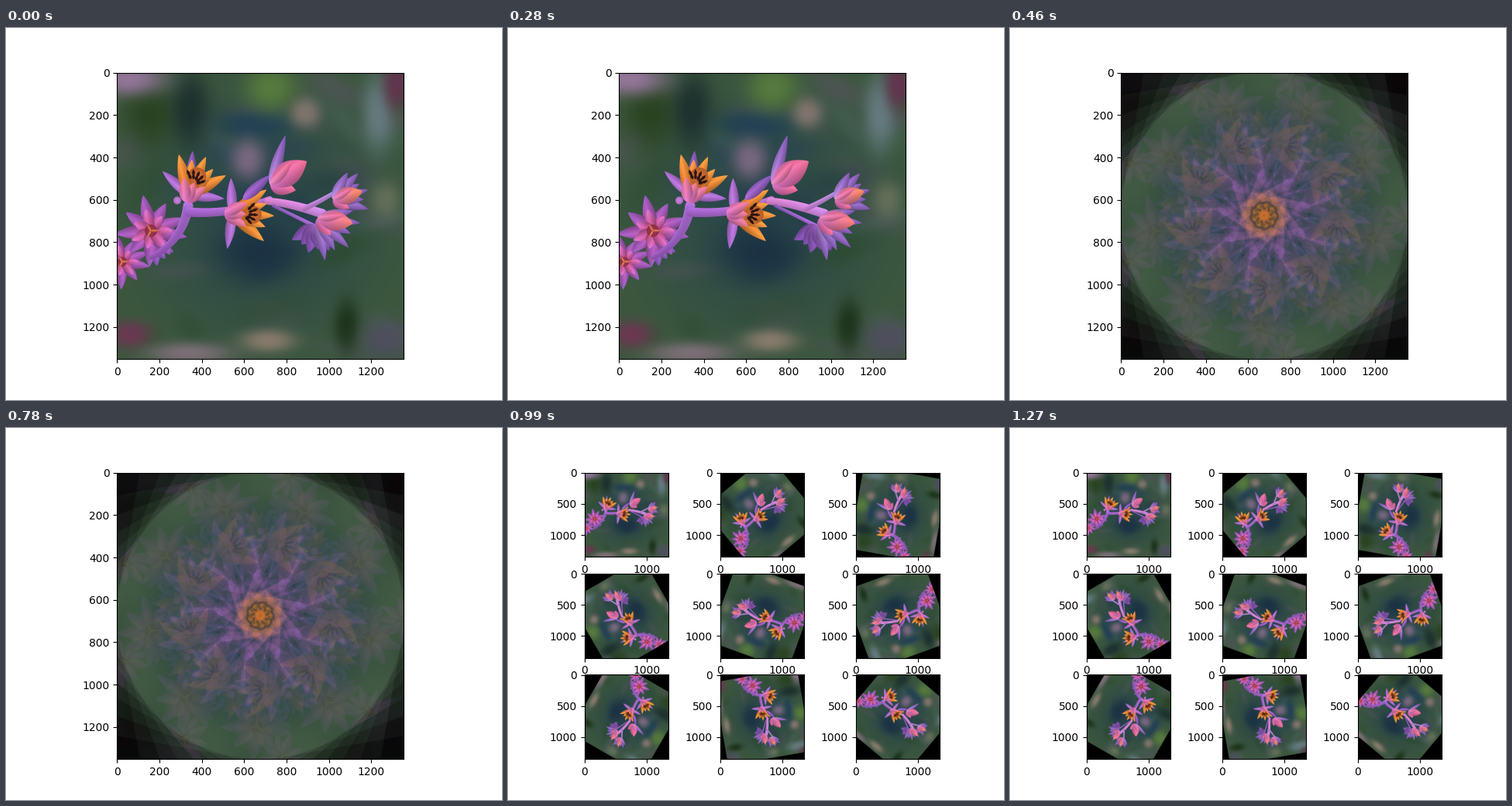
Recreate the animation shown at these times as a matplotlib script. Size 640 px wide and 480 px high, loop 1.45 s.

```python
import numpy as np
import matplotlib.pyplot as plt
from matplotlib.animation import FuncAnimation

SIZE = 1352            # units along each image axis
PX, K = 370, 2         # image width in pixels, oversampling
N = PX * K
LEFT, TOP = 143, 57.5  # stage position of the image
STEP = 10              # ms per frame
ONE, MEAN, GRID = 460, 530, 460

VIOLET, MAUVE, LILAC = '7d55ad', 'a566cc', 'b78bdc'
PINK, ROSE, ORANGE, AMBER = 'dc74c4', 'e66a90', 'e0702c', 'f09a40'
PLUM, DARK = 'c04a80', '2c1512'

rng = np.random.default_rng(4)
yy, xx = np.mgrid[0:N, 0:N]
X = LEFT + (xx + .5) / K
Y = TOP + (yy + .5) / K


def rgb(h):
    return np.array([int(h[i:i + 2], 16) for i in (0, 2, 4)], float)


def mix(c0, c1, t):
    t = np.asarray(t)[..., None]
    return rgb(c0) * (1 - t) + rgb(c1) * t


def polar(x, y, r, ang):
    b = np.radians(ang)
    return x + r * np.cos(b), y - r * np.sin(b)


# ---- blurred backdrop
img = mix('28454b', '3c573e', np.clip(np.hypot(X - 328, Y - 242) / 200, 0, 1))


def blob(x, y, rx, ry, col, tilt=0, alpha=.92):
    c, s = np.cos(tilt), np.sin(tilt)
    u = ((X - x) * c + (Y - y) * s) / rx
    v = ((Y - y) * c - (X - x) * s) / ry
    a = alpha * np.exp(-(u * u + v * v) ** 1.25)[..., None]
    img[:] += (rgb(col) - img) * a


for i in range(40):
    x, y = rng.uniform(LEFT, LEFT + PX), rng.uniform(TOP, TOP + PX)
    near = np.hypot(x - 328, y - 242) < 110
    tones = ['25405a', '1f3740'] if near else ['2b4a2c', '4c665f', '54545c']
    blob(x, y, rng.uniform(20, 45), rng.uniform(10, 20), rng.choice(tones),
         rng.uniform(-1, 1), .4)

for spot in [(185, 110, 34, 46, '28421f'), (238, 105, 26, 50, '1c2f2d'),
             (320, 125, 52, 20, '203f56'), (325, 290, 55, 38, '1b3144'),
             (440, 385, 17, 34, '1b3218'), (342, 78, 34, 30, '587d3e'),
             (312, 170, 22, 26, '7d6a84'), (386, 110, 20, 20, '84776f'),
             (480, 110, 20, 50, '677d83'), (504, 74, 18, 32, '64324f'),
             (490, 222, 20, 24, '65705a'), (490, 402, 34, 26, '504e60'),
             (156, 66, 48, 22, '9a78a0'), (160, 396, 28, 18, '6e3653'),
             (236, 420, 56, 14, '80707a'), (338, 404, 36, 15, '8c7d6e')]:
    blob(*spot)


# ---- plant
def window(xs, ys, pad):
    def cut(v, o):
        return slice(max(0, int((min(v) - pad - o) * K)),
                     max(0, int((max(v) + pad - o) * K) + 2))
    return cut(ys, TOP), cut(xs, LEFT)


def blend(win, a, col):
    img[win] += (np.clip(col, 0, 255) - img[win]) * a[..., None]


def petal(x, y, r, ang, w, c0, c1, fat=.75):
    """Pointed leaf of length r and half width w."""
    x1, y1 = polar(x, y, r, ang)
    win = window((x, x1), (y, y1), w + 1)
    dx, dy = (x1 - x) / r, (y1 - y) / r
    px, py = X[win] - x, Y[win] - y
    t = np.clip((px * dx + py * dy) / r, 0, 1)
    d = py * dx - px * dy
    half = w * np.sin(np.pi * t ** fat) ** .85
    a = np.clip((half - abs(d)) * K + .5, 0, 1) * (t > 0) * (t < 1)
    shade = 1.1 - .3 * abs(d / w + .25)
    blend(win, a, mix(c0, c1, t) * shade[..., None])


def dot(x, y, r, col):
    win = window((x - r, x + r), (y - r, y + r), 1)
    q = np.hypot(X[win] - x, Y[win] - y)
    a = np.clip((r - q) * K + .5, 0, 1)
    blend(win, a, rgb(col) * (1.08 - .2 * q / r)[..., None])


def fan(x, y, r, a0, a1, n, w, c0, c1):
    """Leaves spread from angle a0 to a1, every second one shorter."""
    for i, ang in enumerate(np.linspace(a0, a1, n)):
        petal(x, y, r * (1 - .15 * (i % 2)), ang, w, c0, c1)


def stem(p0, p1, p2, w0, w1, c0, c1):
    """Tapered curve with p1 as its control point."""
    for t in np.linspace(0, 1, 70):
        x, y = [(1 - t) ** 2 * a + 2 * t * (1 - t) * b + t * t * c
                for a, b, c in zip(p0, p1, p2)]
        r = w0 + (w1 - w0) * t
        win = window((x - r, x + r), (y - r, y + r), 1)
        a = np.clip((r - np.hypot(X[win] - x, Y[win] - y)) * K + .5, 0, 1)
        shade = 1 - .14 * (Y[win] - y) / r
        blend(win, a, mix(c0, c1, t) * shade[..., None])


def stamens(x, y, ang):
    for i in range(10):
        b = ang + (i % 5 - 2) * 24
        petal(*polar(x, y, 4 + i, b), 8, b, 1.8, DARK, DARK)


def star(x, y, r):
    fan(x, y, r, 20, 350, 9, r * .18, 'c45cb8', '9458b6')
    fan(x, y, r * .6, 0, 310, 7, r * .15, PLUM, 'd873c8')
    dot(x, y, r * .17, '9c3450')
    fan(x, y, r * .3, 0, 240, 3, 1.5, 'e08a3c', PLUM)


def blossom(x, y, ang, r, spread):
    for side in (spread, -spread):
        petal(x, y, r * .85, ang + side, 6.5, 'c07cd6', MAUVE)
    fan(x, y, r, ang - 38, ang + 38, 5, 8, ORANGE, AMBER)
    dot(*polar(x, y, r * .48, ang), r * .22, 'cc6a30')
    stamens(*polar(x, y, r * .27, ang), ang)
    fan(*polar(x, y, 10, ang + 180), r * .6, ang - 28, ang + 28, 3, 7.5,
        PINK, 'e4788e')


def bud(x, y, ang, r, a0, a1, n, tip=ROSE):
    fan(x, y, r * 1.2, a0, a1, n, 7, LILAC, VIOLET)
    petal(x, y, r * .6, ang - 45, r * .18, PINK, ROSE)
    petal(x, y, r, ang, r * .28, PINK, tip, .9)
    petal(x, y, r * .75, ang + 14, r * .12, 'de80b8', ROSE)


star(150, 302, 36)
fan(190, 280, 28, -80, -20, 3, 7, MAUVE, VIOLET)
star(187, 262, 47)

stem((188, 296), (228, 275), (235, 230), 3.5, 6.5, '9a58bc', 'ad70d8')
stem((236, 238), (290, 242), (340, 222), 6, 4.5, 'a060c8', 'b070cc')
stem((338, 224), (365, 226), (408, 240), 4.5, 6, 'd27cc4', 'c483d8')
stem((384, 234), (402, 226), (422, 214), 3.5, 2.5, 'c47ccc', LILAC)
stem((345, 230), (370, 242), (398, 256), 2, 2.5, VIOLET, MAUVE)

petal(238, 200, 41, 86, 6, MAUVE, VIOLET)
dot(221, 223, 5, 'c07ad6')
blossom(236, 216, 66, 54, 72)
blossom(292, 240, -3, 54, 95)

petal(306, 222, 48, 42, 7, MAUVE, VIOLET)
bud(341, 203, 33, 56, 73, 73, 1)

fan(400, 256, 36, -150, -40, 6, 9, MAUVE, '744aa0')
bud(422, 222, 16, 39, -15, 62, 6, 'ee8452')
bud(402, 246, -8, 46, -80, 12, 6, 'ee7a72')


# ---- turned copies, counter-clockwise about the middle
def turn(deg):
    c, s = np.cos(np.radians(deg)), np.sin(np.radians(deg))
    mid = (N - 1) / 2
    u, v = xx - mid, yy - mid
    sx = np.rint(u * c - v * s + mid).astype(int)
    sy = np.rint(u * s + v * c + mid).astype(int)
    ok = (sx >= 0) & (sx < N) & (sy >= 0) & (sy < N)
    out = img[sy.clip(0, N - 1), sx.clip(0, N - 1)] * ok[..., None]
    return out.reshape(PX, K, PX, K, 3).mean((1, 3))


turned = [turn(40 * i) for i in range(9)]

fig = plt.figure(figsize=(6.4, 4.8), dpi=100)


def panel(pos, data):
    ax = fig.add_subplot(*pos)
    ax.imshow(data.clip(0, 255).astype(np.uint8),
              extent=(-.5, SIZE - .5, SIZE - .5, -.5))
    return ax


scenes = [
    [panel((1, 1, 1), turned[0])],
    [panel((1, 1, 1), np.mean(turned, axis=0))],
    [panel((3, 3, i + 1), t) for i, t in enumerate(turned)],
]


def draw(i):
    t = i * STEP
    now = (t >= ONE) + (t >= ONE + MEAN)
    for k, axes in enumerate(scenes):
        for ax in axes:
            ax.set_visible(k == now)
    return []


anim = FuncAnimation(fig, draw, frames=(ONE + MEAN + GRID) // STEP,
                     init_func=lambda: draw(0), interval=STEP,
                     repeat=True, repeat_delay=0, blit=False)
plt.show()
```
